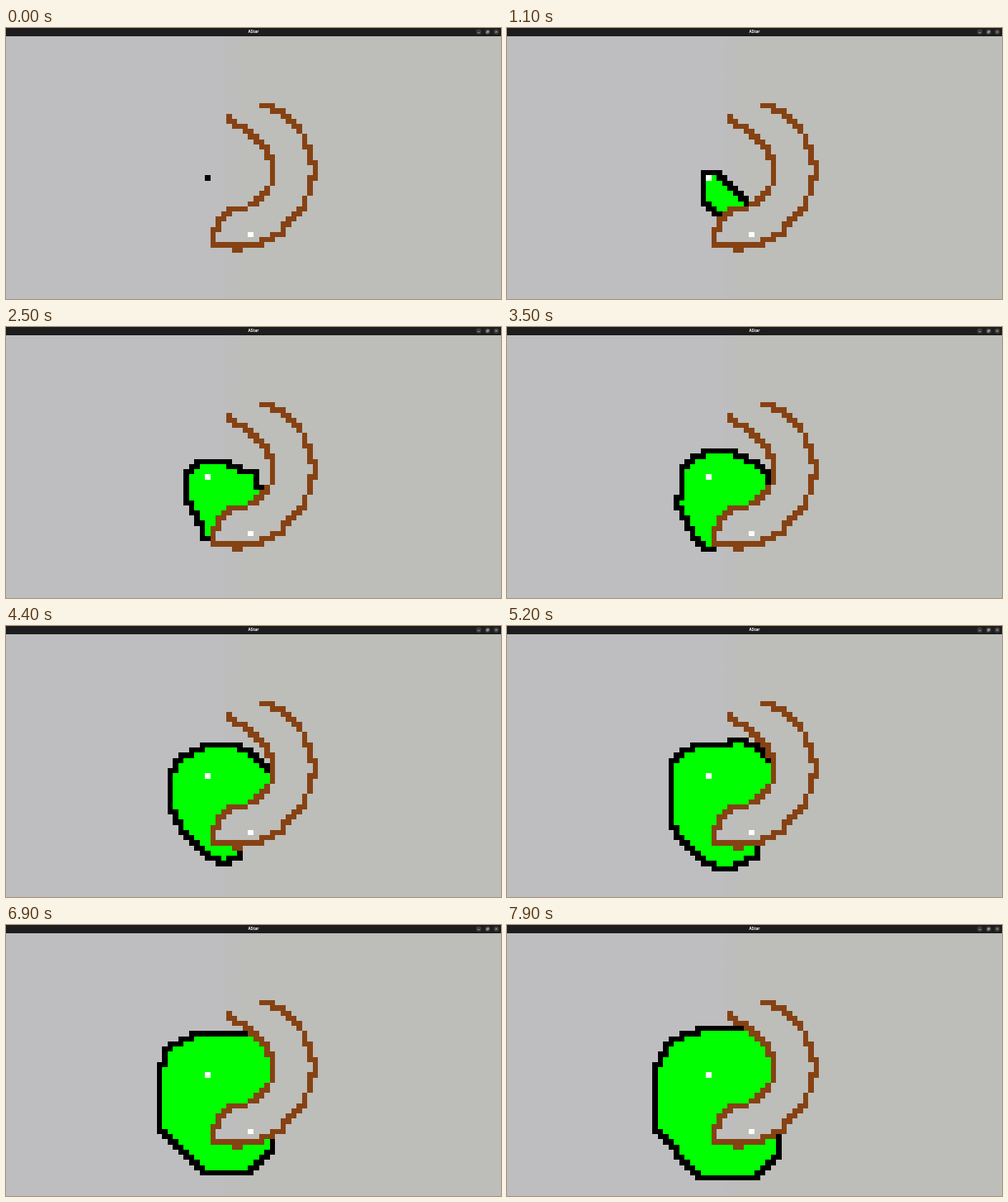
Recreate the animation shown at these times as an HTML page with a canvas. Size 600 by 328 pixels, loop 8 s.

```html
<!DOCTYPE html>
<html lang="en">
<head>
<meta charset="utf-8">
<title>AStar</title>
<style>
  html, body { margin: 0; width: 100%; height: 100%; overflow: hidden; }
  body { position: relative; background: linear-gradient(90deg, #bebdbf 262px, #bdbdb9 296px); }
  canvas, header, svg { position: absolute; left: 0; top: 0; display: block; }
  header {
    width: 600px; height: 10px; background: #1d1d1d; color: #fff;
    font: bold 4.8px/9.4px "Noto Sans", "Open Sans", sans-serif; text-align: center;
  }
</style>
</head>
<body>
<canvas width="600" height="328"></canvas>
<header>AStar
  <svg width="600" height="10" fill="none" stroke="#ddd" stroke-width=".6">
    <g fill="#3b3b3b" stroke="none">
      <circle cx="573" cy="4.7" r="3.2"/><circle cx="583.7" cy="4.7" r="3.2"/><circle cx="594.3" cy="4.7" r="3.2"/>
    </g>
    <path d="M571.8 5.6h2.4M582.6 4.4h1.7v1.7h-1.7zM583.3 3.6h1.8v1.8M593.2 3.6l2.2 2.2m0-2.2l-2.2 2.2"/>
  </svg>
</header>
<script>
const COLS = 92, ROWS = 51, TOP = 10;
const START = [37, 27], GOAL = [45, 38];
const ctx = document.querySelector('canvas').getContext('2d');
const id = (x, y) => y * COLS + x;

// Wall spans, one entry per grid row, beginning at row 13
const walls = new Set();
('47-49|49-51|41 51-52|41-42 52-53|42-44 53-54|44-45 54|45-46 55|46-47 55|47-48 55-56|48 56|' +
 '48-49 56|49 56-57|49 57|49 57|49 56-57|49 56|48 56|47-48 56|46-47 55|45-46 55|41-44 54-55|' +
 '40-41 53-54|39-40 52-53|39 51-52|38-39 51|38 49-51|38 47-49|38-47|42-43')
  .split('|').forEach((row, i) => row.split(' ').forEach(span => {
    const [a, b = a] = span.split('-').map(Number);
    for (let x = a; x <= b; x++) walls.add(id(x, 13 + i));
  }));

function octile(x, y) {
  const dx = Math.abs(x - GOAL[0]), dy = Math.abs(y - GOAL[1]);
  return 10 * Math.max(dx, dy) + 4 * Math.min(dx, dy);
}

// A* with costs 10 and 14; ties go to the node nearer the goal.
function search(limit) {
  const node = (x, y, g, opened) => ({ x, y, g, h: octile(x, y), opened, closed: Infinity });
  const nodes = new Map([[id(...START), node(...START, 0, -1)]]);
  const open = new Set(nodes.values());
  let step = 0;
  while (open.size) {
    let best = null;
    for (const n of open) {
      const d = best ? n.g + n.h - best.g - best.h : -1;
      if (d < 0 || (d === 0 && n.h < best.h)) best = n;
    }
    if (best.g + best.h > limit) break;
    open.delete(best);
    best.closed = step;
    for (let dy = -1; dy <= 1; dy++) for (let dx = -1; dx <= 1; dx++) {
      const x = best.x + dx, y = best.y + dy, key = id(x, y);
      if ((!dx && !dy) || x < 0 || y < 0 || x >= COLS || y >= ROWS || walls.has(key)) continue;
      if (dx && dy && walls.has(id(x, best.y)) && walls.has(id(best.x, y))) continue;
      const g = best.g + (dx && dy ? 14 : 10), seen = nodes.get(key);
      if (!seen) {
        const fresh = node(x, y, g, step);
        nodes.set(key, fresh);
        open.add(fresh);
      } else if (g < seen.g) seen.g = g;
    }
    step++;
  }
  return [...nodes.values()];
}

const nodes = search(330);

// Pace: at each tick, the total cost and remaining distance the search has covered
const pace = [[9, 142, 999], [18, 166, 999], [25, 190, 999], [35, 224, 154],
              [52, 262, 182], [69, 298, 999], [79, 316, 150]]
  .map(([tick, f, h]) => [tick, nodes.filter(n => n.closed < Infinity &&
    (n.g + n.h < f || (n.g + n.h === f && n.h <= h))).length]);
pace.unshift([0, 0]);

function expanded(tick) {
  const i = Math.max(1, pace.findIndex(p => p[0] >= tick));
  const [t0, n0] = pace[i - 1], [t1, n1] = pace[i];
  return Math.round(n0 + (n1 - n0) * (tick - t0) / (t1 - t0));
}

function cell(x, y, color) {
  const px = c => Math.round(c * 600 / COLS), py = r => Math.round(TOP + r * 318 / ROWS);
  ctx.fillStyle = color;
  ctx.fillRect(px(x), py(y), px(x + 1) - px(x), py(y + 1) - py(y));
}

function draw(now) {
  const count = expanded(Math.floor(now % 8000 / 100));
  ctx.clearRect(0, 0, 600, 328);
  for (const n of nodes) {
    if (n.opened < count) cell(n.x, n.y, n.closed < count ? '#0f0' : '#000');
  }
  for (const key of walls) cell(key % COLS, Math.floor(key / COLS), '#864213');
  cell(...GOAL, '#fff');
  if (count) cell(...START, '#fff');
}

const begin = performance.now();
(function loop() {
  draw(performance.now() - begin);
  requestAnimationFrame(loop);
})();
</script>
</body>
</html>
```
